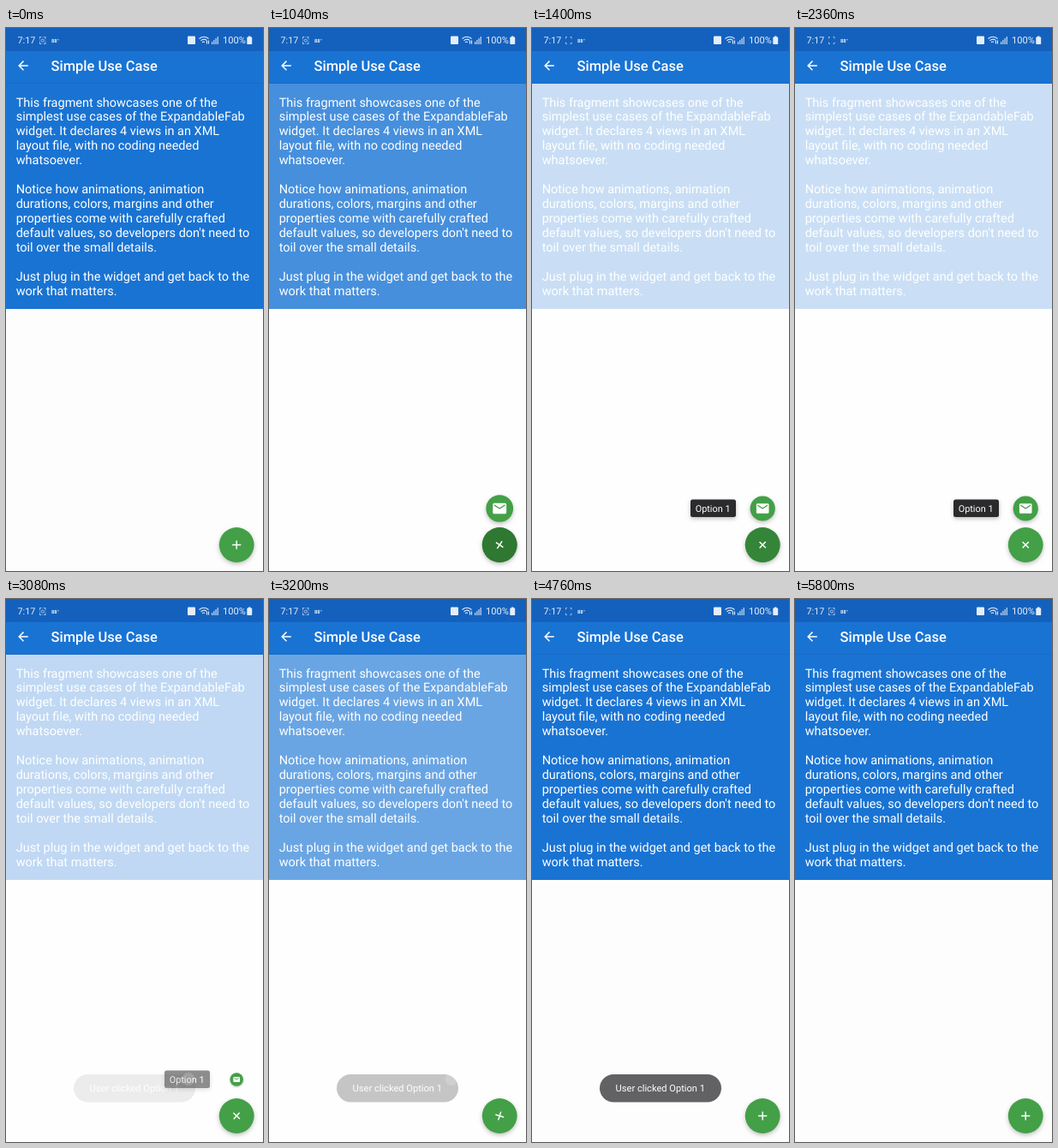
Recreate the animation shown at these times as an HTML page. Size 300 px wide and 634 px high, loop 5880 ms.

```html
<!DOCTYPE html>
<html lang="en">
<head>
<meta charset="utf-8">
<title>Simple Use Case</title>
<style>
  html, body { margin: 0; width: 100%; height: 100%; overflow: hidden; background: #fefdfe; }
  svg { display: block; width: 300px; height: 634px; font-family: Roboto, sans-serif; fill: #fff; }
  text { text-rendering: geometricPrecision; }
  .fab { filter: drop-shadow(0 2.5px 2.5px rgba(0, 0, 0, .25)); }
  .line { fill: none; stroke: #e4eefa; }
</style>
</head>
<body>
<svg viewBox="0 0 300 634">
  <rect width="300" height="634" fill="#fefdfe"/>
  <rect y="64" width="300" height="264" fill="#1973d3"/>
  <text id="copy" font-size="14.5"></text>
  <rect id="overlay" y="65" width="300" height="569" opacity="0"/>

  <rect width="300" height="65" fill="#176bc6"/>
  <rect width="300" height="64" fill="#1973d3"/>
  <rect width="300" height="27" fill="#1461bd"/>
  <path transform="translate(11.2 35.2) scale(.73)" d="M20 11H7.83l5.59-5.59L12 4l-8 8 8 8 1.41-1.41L7.83 13H20z"/>
  <text x="52.5" y="50" font-size="16.5" font-weight="500">Simple Use Case</text>

  <g fill="#e4eefa">
    <text x="13.5" y="18" font-size="10.8">7:17</text>
    <path class="line" opacity=".65" d="M39.5 12.5v-2h1.5M44.5 10.5h1.5v2M39.5 16.5v2h1.5M44.5 18.5h1.5v-2"/>
    <g id="blink" class="line" stroke-width=".9" opacity=".75">
      <path d="M39.5 13v-2.5h6.5v8h-6.5z" opacity=".3"/>
      <circle cx="42.8" cy="14.6" r="1.6"/>
    </g>
    <text x="53" y="16.5" font-size="5.8" font-weight="700">88°</text>
    <rect x="212" y="9.5" width="9" height="9.5" rx="1"/>
    <path class="line" stroke-width="1.1" d="M225.5 12.5q5.5-4.5 11 0M227.5 14.7q3.5-2.8 6.5-.5M229 16.7q2-1.3 3 0M234.5 18.5v-4M236.5 14.5v4"/>
    <path opacity=".8" d="M240 16h1.3v3h-1.3zM242.2 14h1.3v5h-1.3zM244.4 12h1.3v7h-1.3zM246.6 10h1.3v9h-1.3z"/>
    <text x="253" y="18" font-size="11.1">100%</text>
    <path d="M283 9.5h2.5v1h1q.7 0 .7.7v7q0 .8-.7.8h-4.5q-.7 0-.7-.8v-7q0-.7.7-.7h1z"/>
  </g>

  <g id="label" class="fab" opacity="0">
    <rect x="185" y="550.5" width="53" height="20.5" rx="2.5" fill="#2b2a2d"/>
    <text x="190.7" y="565" font-size="10.9">Option 1</text>
  </g>
  <g id="option" class="fab">
    <circle r="14.6" fill="#43a047"/>
    <path transform="scale(.73) translate(-12 -12)" d="M20 4H4c-1.1 0-2 .9-2 2v12c0 1.1.9 2 2 2h16c1.1 0 2-.9 2-2V6c0-1.1-.9-2-2-2zm0 4l-8 5-8-5V6l8 5 8-5z"/>
  </g>
  <g class="fab" transform="translate(269.2 603.5)">
    <circle r="20.4" fill="#43a047"/>
    <circle id="press" r="20.4" fill="#2e7831" opacity="0"/>
    <path id="icon" d="M-5.1-.73h4.37v-4.37h1.46v4.37h4.37v1.46h-4.37v4.37h-1.46v-4.37h-4.37z"/>
  </g>

  <g id="toast" opacity="0">
    <rect x="79" y="555" width="142" height="32.5" rx="16.2" fill="#626163"/>
    <text x="149.8" y="575" font-size="11.1" text-anchor="middle">User clicked Option 1</text>
  </g>
  <circle id="touch" cx="213" cy="560.5" r="7.5" opacity="0"/>
</svg>
<script>
const LOOP = 5880, OPEN = 846, CLOSE = 3030;
const $ = id => document.getElementById(id);
const set = (id, name, value) => $(id).setAttribute(name, value);

$('copy').innerHTML = `This fragment showcases one of the
simplest use cases of the ExpandableFab
widget. It declares 4 views in an XML
layout file, with no coding needed
whatsoever.

Notice how animations, animation
durations, colors, margins and other
properties come with carefully crafted
default values, so developers don't need to
toil over the small details.

Just plug in the widget and get back to the
work that matters.`.split('\n')
  .map((line, i) => `<tspan x="11.7" y="${91.5 + 16.95 * i}">${line}</tspan>`).join('');

const ramp = (t, start, length) => Math.min(1, Math.max(0, (t - start) / length));
const smooth = x => .5 - .5 * Math.cos(Math.PI * x);
const overshoot = x => 1 + (x - 1) ** 2 * (3 * (x - 1) + 2);

function draw(t) {
  const open = smooth(ramp(t, OPEN, 580));
  const turnBack = smooth(ramp(t, CLOSE, 577));
  const fade = smooth(ramp(t, CLOSE, 325));
  const leave = ramp(t, CLOSE - 10, 130);
  const slide = ramp(t, 1060, 250);

  set('overlay', 'opacity', .77 * open * (1 - fade));
  set('icon', 'transform', `rotate(${135 * open * (1 - turnBack)})`);
  set('press', 'opacity', ramp(t, 600, 220) * (1 - ramp(t, 1250, 450)));

  const size = overshoot(ramp(t, OPEN + 20, 240)) * (1 - leave);
  set('option', 'transform', `translate(269.2 561) scale(${size})`);
  set('option', 'visibility', size > .01 ? 'visible' : 'hidden');

  set('label', 'transform', `translate(${38 * (1 - overshoot(slide))} 0)`);
  set('label', 'opacity', Math.min(1, 1.5 * slide) * (1 - leave));

  set('toast', 'opacity', ramp(t, CLOSE, 480) * (1 - ramp(t, 5300, 260)));
  set('touch', 'opacity', t > 2880 && t < 3240 ? .18 : 0);
  set('blink', 'visibility', (t + 200) % 1000 < 500 ? 'visible' : 'hidden');
}

function frame() {
  draw(performance.now() % LOOP);
  requestAnimationFrame(frame);
}
frame();
</script>
</body>
</html>
```
